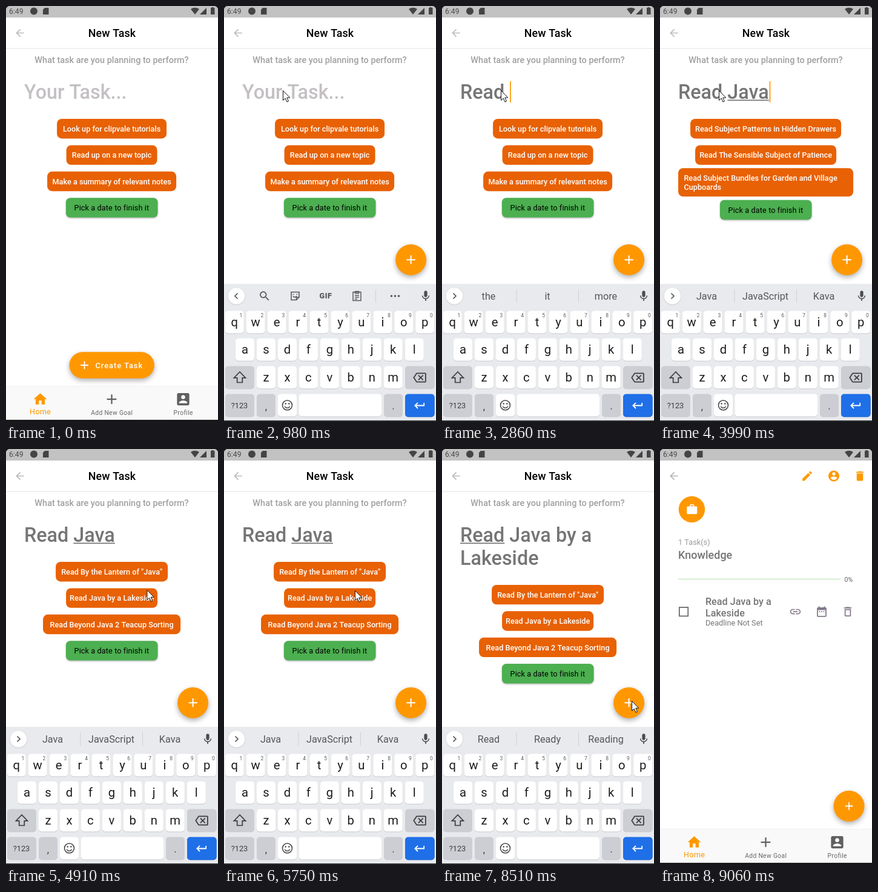
Write an HTML page with a canvas that moves like this. It is 350x684 px and loops after 9750 ms.

```html
<!DOCTYPE html>
<html lang="en">
<head>
<meta charset="utf-8">
<title>New Task</title>
<style>
html, body { margin: 0; width: 100%; height: 100%; overflow: hidden; background: #fff; }
canvas { display: block; width: 350px; height: 684px; }
</style>
</head>
<body>
<canvas id="stage"></canvas>
<script>
const W = 350, H = 684, LOOP = 9750;
const ORANGE = '#ff9800', GREY = '#757575', DARK = '#4a4a4c';
const canvas = document.getElementById('stage');
const dpr = window.devicePixelRatio || 1;
canvas.width = W * dpr;
canvas.height = H * dpr;
const g = canvas.getContext('2d');

const clamp = v => Math.min(1, Math.max(0, v));
const span = (t, a, b) => clamp((t - a) / (b - a));
const ease = v => v * v * (3 - 2 * v);
const mix = (a, b, v) => a + (b - a) * v;

const ICON = {
  home: 'M10 20v-6h4v6h5v-8h3L12 3 2 12h3v8z',
  add: 'M19 13h-6v6h-2v-6H5v-2h6V5h2v6h6v2z',
  person: 'M3 5v14c0 1.1.89 2 2 2h14c1.1 0 2-.9 2-2V5c0-1.1-.9-2-2-2H5c-1.11 0-2 .9-2 2zm12 4c0 1.66-1.34 3-3 3s-3-1.34-3-3 1.34-3 3-3 3 1.34 3 3zm-9 8c0-2 4-3.1 6-3.1s6 1.1 6 3.1v1H6v-1z',
  back: 'M20 11H7.83l5.59-5.59L12 4l-8 8 8 8 1.41-1.41L7.83 13H20v-2z',
  edit: 'M3 17.25V21h3.75L17.81 9.94l-3.75-3.75L3 17.25zM20.71 7.04c.39-.39.39-1.02 0-1.41l-2.34-2.34c-.39-.39-1.02-.39-1.41 0l-1.83 1.83 3.75 3.75 1.83-1.83z',
  account: 'M12 2C6.48 2 2 6.48 2 12s4.48 10 10 10 10-4.48 10-10S17.52 2 12 2zm0 3c1.66 0 3 1.34 3 3s-1.34 3-3 3-3-1.34-3-3 1.34-3 3-3zm0 14.2c-2.5 0-4.71-1.28-6-3.22.03-1.99 4-3.08 6-3.08 1.99 0 5.97 1.09 6 3.08-1.29 1.94-3.5 3.22-6 3.22z',
  bin: 'M6 19c0 1.1.9 2 2 2h8c1.1 0 2-.9 2-2V7H6v12zM19 4h-3.5l-1-1h-5l-1 1H5v2h14V4z',
  binLine: 'M6 19c0 1.1.9 2 2 2h8c1.1 0 2-.9 2-2V7H6v12zM8 9h8v10H8V9zm7.5-5l-1-1h-5l-1 1H5v2h14V4z',
  link: 'M3.9 12c0-1.71 1.39-3.1 3.1-3.1h4V7H7c-2.76 0-5 2.24-5 5s2.24 5 5 5h4v-1.9H7c-1.71 0-3.1-1.39-3.1-3.1zM8 13h8v-2H8v2zm9-6h-4v1.9h4c1.71 0 3.1 1.39 3.1 3.1s-1.39 3.1-3.1 3.1h-4V17h4c2.76 0 5-2.24 5-5s-2.24-5-5-5z',
  date: 'M9 11H7v2h2v-2zm4 0h-2v2h2v-2zm4 0h-2v2h2v-2zm2-7h-1V2h-2v2H8V2H6v2H5c-1.11 0-1.99.9-1.99 2L3 20c0 1.1.89 2 2 2h14c1.1 0 2-.9 2-2V6c0-1.1-.9-2-2-2zm0 16H5V9h14v11z',
  work: 'M20 6h-4V4c0-1.11-.89-2-2-2h-4c-1.11 0-2 .89-2 2v2H4c-1.11 0-1.99.89-1.99 2L2 19c0 1.11.89 2 2 2h16c1.11 0 2-.89 2-2V8c0-1.11-.89-2-2-2zm-6 0h-4V4h4v2z',
  search: 'M15.5 14h-.79l-.28-.27C15.41 12.59 16 11.11 16 9.5 16 5.91 13.09 3 9.5 3S3 5.91 3 9.5 5.91 16 9.5 16c1.61 0 3.09-.59 4.23-1.57l.27.28v.79l5 4.99L20.49 19l-4.99-5zm-6 0C7.01 14 5 11.99 5 9.5S7.01 5 9.5 5 14 7.01 14 9.5 11.99 14 9.5 14z',
  mic: 'M12 14c1.66 0 2.99-1.34 2.99-3L15 5c0-1.66-1.34-3-3-3S9 3.34 9 5v6c0 1.66 1.34 3 3 3zm5.3-3c0 3-2.54 5.1-5.3 5.1S6.7 14 6.7 11H5c0 3.41 2.72 6.23 6 6.72V21h2v-3.28c3.28-.48 6-3.3 6-6.72h-1.7z',
  erase: 'M22 3H7c-.69 0-1.23.35-1.59.88L0 12l5.41 8.11c.36.53.9.89 1.59.89h15c1.1 0 2-.9 2-2V5c0-1.1-.9-2-2-2zm0 16H7.07L2.4 12l4.66-7H22v14zm-11.59-2L14 13.41 17.59 17 19 15.59 15.41 12 19 8.41 17.59 7 14 10.59 10.41 7 9 8.41 12.59 12 9 15.59z',
  enter: 'M19 7v4H5.83l3.58-3.59L8 6l-6 6 6 6 1.41-1.41L5.83 13H21V7z'
};
for (const k in ICON) ICON[k] = new Path2D(ICON[k]);

function icon(name, x, y, size, color) {
  g.save();
  g.translate(x - size / 2, y - size / 2);
  g.scale(size / 24, size / 24);
  g.fillStyle = color;
  g.fill(ICON[name], 'evenodd');
  g.restore();
}

function font(size, weight) {
  g.font = `${weight} ${size}px Roboto, sans-serif`;
}

function text(s, x, y, size, color, weight = 400, align = 'left', spacing = 0) {
  font(size, weight);
  g.letterSpacing = spacing + 'px';
  g.textAlign = align;
  g.fillStyle = color;
  g.fillText(s, x, y);
  g.letterSpacing = '0px';
}

function rect(x, y, w, h, color) {
  g.fillStyle = color;
  g.fillRect(x, y, w, h);
}

function round(x, y, w, h, r, color) {
  g.fillStyle = color;
  g.beginPath();
  g.roundRect(x, y, w, h, r);
  g.fill();
}

function disc(x, y, r, color) {
  g.fillStyle = color;
  g.beginPath();
  g.arc(x, y, r, 0, 7);
  g.fill();
}

function line(d, color, width) {
  g.strokeStyle = color;
  g.lineWidth = width;
  g.stroke(new Path2D(d));
}

function shadowed(blur, dy, alpha, draw) {
  g.save();
  g.shadowColor = `rgba(0,0,0,${alpha})`;
  g.shadowBlur = blur * dpr;
  g.shadowOffsetY = dy * dpr;
  draw();
  g.restore();
}

function statusBar() {
  rect(0, 0, W, 19, '#c2c2c2');
  text('6:49', 5, 13, 12.2, DARK);
  disc(46, 8.5, 6, '#444');
  g.fillStyle = '#444';
  g.fill(new Path2D('M64 3h6.5v11h-9.500v-8z'));
  g.fill(new Path2D('M305 5q7-4.500 14 0l-7 9z'));
  g.fill(new Path2D('M331 3v11h-11z'));
  g.fill(new Path2D('M338 3h1.500v-1h3v1h2v11h-6.500z'));
  g.fillStyle = '#111';
  g.fill(new Path2D('M0 0h5q-4 1-5 5zM350 0h-5q4 1 5 5z'));
}

function navBar() {
  rect(0, 626, W, 1, '#f0f0f0');
  rect(0, 627, W, 55, '#f9f9fa');
  rect(0, 682, W, 2, '#1c1c1c');
  icon('home', 56.5, 648, 26, ORANGE);
  icon('add', 174.5, 648, 27, '#606060');
  icon('person', 292.5, 648, 27, '#606060');
  text('Home', 56.7, 673, 12.6, ORANGE, 400, 'center', 0.34);
  text('Add New Goal', 174.7, 674, 10.3, '#666', 400, 'center', 0.34);
  text('Profile', 292.7, 674, 10.3, '#666', 400, 'center', 0.34);
}

// label lines, box width
const CHIPS = [
  [0, [['Look up for clipvale tutorials'], 181], [['Read up on a new topic'], 150], [['Make a summary of relevant notes'], 213]],
  [3080, [['Read Subject Patterns in Hidden Drawers'], 249], [['Read The Sensible Subject of Patience'], 233],
    [['Read Subject Bundles for Garden and Village', 'Cupboards'], 289]],
  [4290, [['Read By the Lantern of "Java"'], 185], [['Read Java by a Lakeside'], 151], [['Read Beyond Java 2 Teacup Sorting'], 227]]
];

// start, typed text, underlined part as [from, to], keyboard suggestions
const TYPED = [
  [0, '', 0, 0],
  [1890, 'R', 0, 1, 'R', 'Read', 'Really'],
  [2270, 'Re', 0, 2, 'Re', 'Read', 'Really'],
  [2410, 'Rea', 0, 3, 'Rea', 'Read', 'Really'],
  [2640, 'Read', 0, 4, 'Read', 'Ready', 'Reading'],
  [2860, 'Read ', 0, 0, 'the', 'it', 'more'],
  [3310, 'Read J', 5, 6, 'J', 'Just', 'January'],
  [3540, 'Read Ja', 5, 7, 'Ja', 'Jan', 'James'],
  [3700, 'Read Jav', 5, 8, 'Jav', 'Java', 'Have'],
  [3990, 'Read Java', 5, 9, 'Java', 'JavaScript', 'Kava'],
  [6440, 'Read Java by a', 0, 4],
  [7370, 'Read Java by a', 0, 4, 'Read', 'Ready', 'Reading']
];
const PICKED = 6440;
const CARET = [[350, 850], [1350, 4450], [4950, 5450], [5950, 6980], [7520, 8050]];
const current = (list, t) => list.filter(e => e[0] <= t).pop();

function chips(t) {
  const shift = t >= PICKED ? 37.9 : 0;
  const [start, ...rows] = current(CHIPS, t);
  const tall = start === 3080;
  rows.forEach(([lines, w], i) => {
    const two = lines.length > 1;
    const y = (two ? 267.2 : 186 + i * 43.4) + shift;
    const x = 174.6 - w / 2;
    round(x, y, w, two ? 46.8 : 32.4, 8, '#e86104');
    if (two) lines.forEach((s, n) => text(s, x + 9.3, y + 21 + n * 14.5, 12.7, '#fff', 500));
    else text(lines[0], 174.6, y + 20.9, 12.7, '#fff', 500, 'center');
  });
  const y = (tall ? 319.8 : 316.2) + shift;
  shadowed(3, 1.2, 0.3, () => round(99, y, 151.5, 32.4, 7, '#4caf50'));
  text('Pick a date to finish it', 174.4, y + 20.8, 12.7, '#000', 400, 'center', 0.1);
}

function field(t) {
  const [, typed, from, to] = current(TYPED, t);
  const hint = t < 1890 ? 1 : 0.45 * (1 - span(t, 1900, 2050));
  const size = 32.34, left = 30;
  if (hint > 0) {
    g.save();
    g.globalAlpha *= hint;
    text('Your Task...', left, 153, size, '#c4c0c4', 500);
    g.restore();
  }
  text(typed, left, 153, size, GREY, 500);
  const width = n => g.measureText(typed.slice(0, n)).width;
  if (to) rect(left + width(from), 154.5, width(to) - width(from), 1.7, GREY);
  const end = t >= PICKED ? 0 : width(typed.length);
  if (t >= PICKED) text('Lakeside', left, 191, size, GREY, 500);
  if (CARET.some(([a, b]) => t >= a && t < b)) rect(left + end + 0.8, 124, 1.7, 35, ORANGE);
}

function taskPage(t) {
  rect(0, 19, W, H - 19, '#fff');
  icon('back', 23, 44.5, 20.4, '#bdbdbd');
  text('New Task', 175, 51.3, 17.87, '#000', 500, 'center', 0.13);
  rect(0, 69.5, W, 1, '#dfe3e3');
  text('What task are you planning to perform?', 174.5, 94, 14.47, '#a0a0a0', 500, 'center');
  field(t);
  chips(t);
}

function goalPage() {
  rect(0, 19, W, H - 19, '#fff');
  icon('back', 23, 44.5, 20.4, '#b4b6b6');
  icon('edit', 243, 44.5, 21, ORANGE);
  icon('account', 287, 44.5, 21.5, ORANGE);
  icon('bin', 330, 44.5, 21, ORANGE);
  disc(52.5, 99.5, 21.7, ORANGE);
  icon('work', 52.8, 99.5, 20.4, '#fff');
  text('1 Task(s)', 30, 158, 12.76, '#9a9a9a');
  text('Knowledge', 30, 181.3, 18, GREY, 500);
  rect(30, 213, 268, 3, '#e0f3e0');
  text('0%', 304.5, 218.5, 10.5, '#606060');
  g.strokeStyle = '#6c6c6c';
  g.lineWidth = 1.8;
  g.strokeRect(31.9, 261, 14.4, 14.4);
  text('Read Java by a', 75, 257, 16.2, GREY, 500);
  text('Lakeside', 75, 276, 16.2, GREY, 500);
  text('Deadline Not Set', 75, 291, 12.76, '#777');
  icon('link', 223.5, 268, 21, '#85788a');
  icon('date', 267, 268, 21, '#85788a');
  icon('binLine', 310, 268, 21, '#85788a');
  navBar();
}

function key(x, y, w, color, edge = '#c9cacf') {
  round(x, y + 1, w, 37, 5, edge);
  round(x, y, w, 37, 5, color);
}

function toolbar(words) {
  const open = words.length > 0;
  shadowed(2, 0.5, 0.2, () => disc(20.5, 478, 13.8, '#fff'));
  line(open ? 'M18.500 473.500l4.500 4.500l-4.500 4.500' : 'M22.500 473.500l-4.500 4.500l4.500 4.500', '#555', 1.7);
  icon('mic', 333, 478, 21, '#4d4d50');
  if (open) {
    words.forEach((s, i) => text(s, [77, 174, 270.5][i], 484, 16.2, '#55565a', 400, 'center'));
    rect(122.5, 467, 1, 22, '#cfd0d4');
    rect(225, 467, 1, 22, '#cfd0d4');
    return;
  }
  icon('search', 67, 478, 21, '#5a5a5e');
  line('M111 471.500h13v8.500l-4.500 4.500h-8.500zM124 480h-4.500v4.500M114 478q3 4 6 0M114.500 474.500v1.500M120.500 474.500v1.500', '#5a5a5e', 1.6);
  text('GIF', 168, 482.2, 12.6, '#5a5a5e', 900, 'center', 0.6);
  line('M213 471.500h13v14h-13zM216.500 470.500h6v3h-6zM216 477h7M216 480h7M216 483h4', '#5a5a5e', 1.5);
  rect(250, 467, 1, 22, '#cfd0d4');
  for (const x of [276.5, 282.5, 288.5]) disc(x, 478, 1.8, '#5a5a5e');
}

function keyboard(t, top) {
  if (top >= H) return;
  g.save();
  g.translate(0, top - 458);
  rect(0, 458, W, 226, '#e8eaed');
  toolbar(current(TYPED, t).slice(4));
  const letter = (c, x, y) => {
    key(x - 15.5, y, 31, '#fff');
    text(c, x, y + 25.5, 20.3, '#1d1d1f', 400, 'center');
  };
  [...'qwertyuiop'].forEach((c, i) => {
    const x = 17.2 + i * 34.95;
    letter(c, x, 502.5);
    text((i + 1) % 10, x + 10.7, 513, 8.5, '#5c5c5f', 400, 'center');
  });
  [...'asdfghjkl'].forEach((c, i) => letter(c, 34.6 + i * 34.95, 547.7));
  [...'zxcvbnm'].forEach((c, i) => letter(c, 69.5 + i * 34.95, 593.5));
  const soft = '#cdced3';
  key(2, 593.5, 48, soft);
  line('M26 603l-9.500 9.800h5.200v7.700h8.600v-7.700h5.200z', '#3c3c40', 1.7);
  key(299, 593.5, 48.5, soft);
  icon('erase', 323, 612.5, 21.5, '#3c3c40');
  key(2, 639.5, 48, soft);
  text('?123', 25.5, 662.5, 12.8, '#3c3c40', 400, 'center');
  key(54, 639.5, 31, soft);
  text(',', 69.5, 666, 17, '#3c3c40', 400, 'center');
  key(88.8, 639.5, 31.2, '#fff');
  line('M112.500 658a8 8 0 1 1-16 0a8 8 0 1 1 16 0M100 660q4.500 5 9 0', '#4a4a4d', 1.6);
  disc(101.7, 655.5, 1.3, '#4a4a4d');
  disc(107.3, 655.5, 1.3, '#4a4a4d');
  key(123.5, 639.5, 136.5, '#fff');
  key(264, 639.5, 31, soft);
  text('.', 279.5, 665, 17, '#3c3c40', 400, 'center');
  key(299, 639.5, 48.5, '#1f6fe8', '#1a62cf');
  icon('enter', 323, 658.5, 21.5, '#fff');
  rect(0, 683, W, 1, '#333');
  g.restore();
}

function fab(x, y, scale, plus) {
  if (scale <= 0) return;
  g.save();
  g.translate(x, y);
  g.scale(scale, scale);
  shadowed(8, 3.5, 0.32, () => disc(0, 0, 25.5, ORANGE));
  icon('add', 0, 0, plus, '#fff');
  g.restore();
}

function createButton(bottom, scale) {
  if (scale <= 0) return;
  g.save();
  g.translate(174.5, bottom - 21.5);
  g.scale(scale, scale);
  shadowed(8, 3.5, 0.32, () => round(-70, -21.7, 140.5, 43.4, 21.7, ORANGE));
  icon('add', -45, 0, 22, '#fff');
  text('Create Task', -27, 4.6, 12.76, '#fff', 500, 'left', 1);
  g.restore();
}

const MOUSE = [[130, 97, 139], [4430, 97, 139], [4450, 237, 230], [4750, 237, 230], [5210, 224, 236], [5450, 222, 235],
  [5750, 216, 233], [5980, 211, 241], [6110, 211, 241], [6140, 211, 264], [6860, 211, 264], [7210, 311, 403],
  [7370, 313, 415], [8960, 313, 415]];

function mouse(t) {
  const i = MOUSE.findIndex(m => m[0] > t);
  if (i < 1) return;
  const [a, x, y] = MOUSE[i - 1], [b, u, v] = MOUSE[i];
  const p = span(t, a, b);
  g.save();
  g.translate(mix(x, u, p), mix(y, v, p));
  const arrow = new Path2D('M.5 .5v16l3.700-3.400l2.700 6l2.600-1.200l-2.700-5.800h5z');
  g.fillStyle = '#fff';
  g.fill(arrow);
  g.strokeStyle = '#111';
  g.lineWidth = 1;
  g.stroke(arrow);
  g.restore();
}

function draw(t) {
  g.setTransform(dpr, 0, 0, dpr, 0, 0);
  const rise = ease(span(t, 280, 530)) - ease(span(t, 8590, 8800));
  const top = mix(H, 458, rise);
  const leave = ease(span(t, 8650, 8980));
  if (leave > 0) goalPage();
  if (leave < 1) {
    g.save();
    g.globalAlpha = 1 - leave;
    g.translate(0, 50 * leave);
    taskPage(t);
    g.restore();
    navBar();
  }
  keyboard(t, top);
  if (t < 800) createButton(Math.min(627, top) - 13.5, 1 - span(t, 540, 740));
  fab(mix(308.6, 312, leave), mix(418.2, 588.5, leave), ease(span(t, 740, 940)), mix(24.5, 21.5, leave));
  statusBar();
  mouse(t);
}

function tick(now) {
  draw(now % LOOP);
  requestAnimationFrame(tick);
}
draw(0);
requestAnimationFrame(tick);
</script>
</body>
</html>
```
